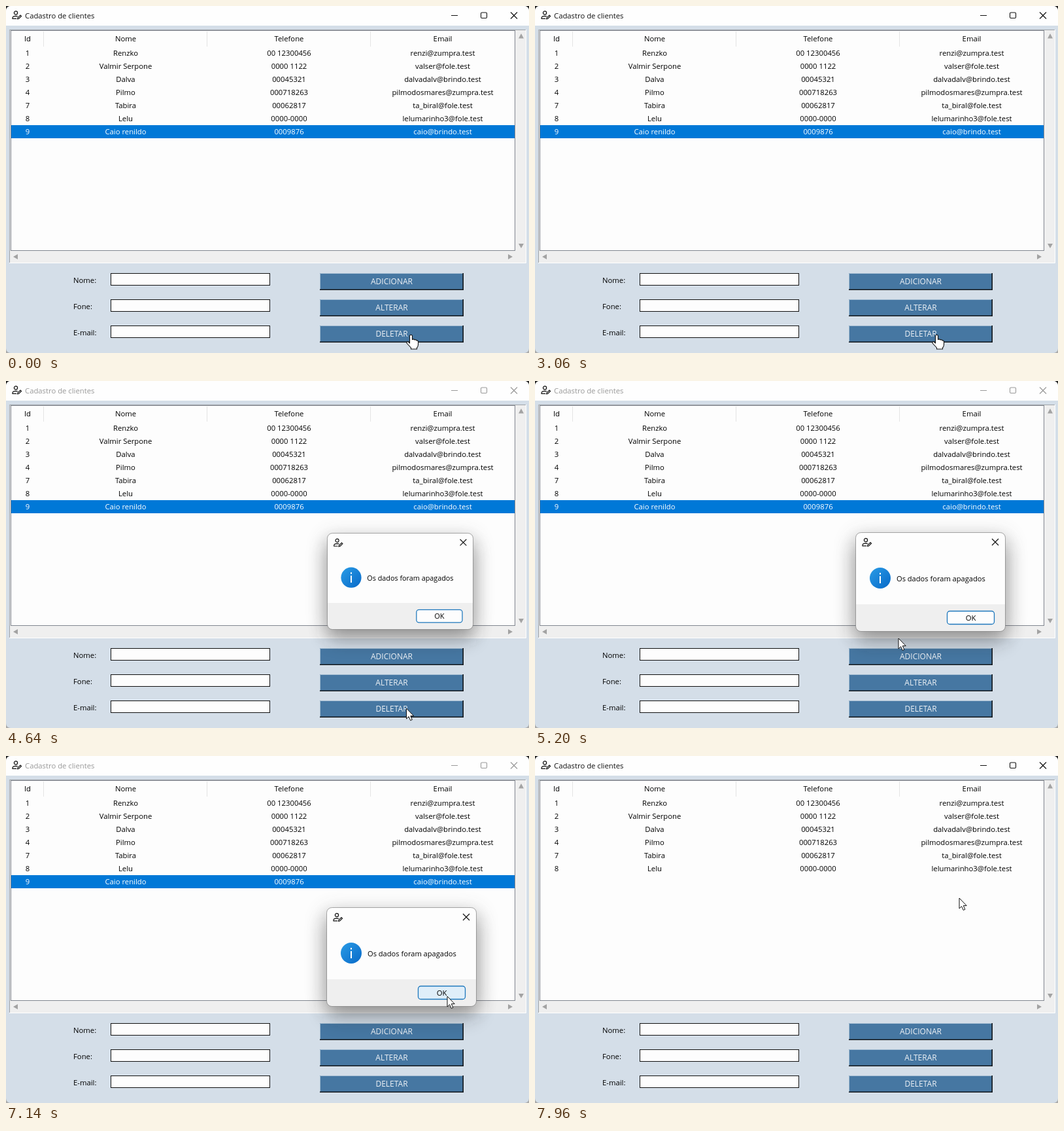
Animation, 800 px wide and 530 px high, one loop 8000 ms. Source, as an HTML page:

```html
<!DOCTYPE html>
<html lang="pt">
<head>
<meta charset="utf-8">
<style>
html, body { margin: 0; width: 100%; height: 100%; overflow: hidden; background: linear-gradient(#222 50%, #aaa 50%); }
svg { display: block; width: 800px; height: 530px; font: 11.3px "Open Sans", "Noto Sans", sans-serif; }
.mid { text-anchor: middle; }
.btn { font-size: 12px; fill: #eef2f6; }
.line { fill: none; stroke: #111; stroke-width: 1.2; }
</style>
</head>
<body>
<svg viewBox="0 0 800 530">
  <defs>
    <clipPath id="window"><rect width="800" height="530" rx="7"/></clipPath>
    <linearGradient id="info" x2="1" y2="1"><stop stop-color="#2a9ce6"/><stop offset="1" stop-color="#0869c8"/></linearGradient>
    <filter id="soft" x="-40%" y="-40%" width="180%" height="180%"><feGaussianBlur stdDeviation="15"/></filter>
    <g id="person" class="line">
      <circle cx="6" cy="3.5" r="2.6"/>
      <path d="M7 12.3H1V11Q1.5 8.5 6 8.4Q8 8.4 9 9M8.5 12.8L9 11L13 7L14.5 8.5L10.5 12.5Z"/>
    </g>
  </defs>
  <g clip-path="url(#window)">
    <rect width="800" height="530" fill="#d4dee8"/>
    <rect width="800" height="30" fill="#fefefe"/>
    <use href="#person" x="9" y="7"/>
    <g id="titleBar">
      <text x="29" y="19">Cadastro de clientes</text>
      <path fill="none" stroke="currentColor" stroke-width="1.1" d="M681 14.5H691M772 9.5L782 19.5M782 9.5L772 19.5M728 10H734Q735.5 10 735.5 11.5V17Q735.5 18.5 734 18.5H728Q726.5 18.5 726.5 17V11.5Q726.5 10 728 10Z"/>
    </g>
    <path fill="none" stroke="#a0a4a8" d="M5.5 392V36.5H795"/>
    <path fill="none" stroke="#fff" d="M5 392.5H795.5V36"/>
    <rect x="6" y="37" width="789" height="355" fill="#efefef"/>
    <rect x="7.5" y="37.5" width="771" height="336" fill="#fdfdfd" stroke="#828790"/>
    <path stroke="#e4e4e4" d="M57.5 39V62M307.5 39V62M557.5 39V62"/>
    <path fill="#a3a3a3" d="M784 49.5H792L788 42ZM784 363H792L788 370ZM18 379V387L11 383ZM768 379V387L775 383Z"/>
    <g id="table"></g>
    <g id="form"></g>
    <g id="dialog">
      <rect x="485" y="235" width="240" height="150" rx="12" fill="#444" opacity=".2" filter="url(#soft)"/>
      <rect x="491" y="250" width="228" height="148" rx="8" fill="#222" opacity=".38" filter="url(#soft)"/>
      <rect x="491" y="232" width="228" height="150" rx="8" fill="#fdfdfd"/>
      <path d="M491 341H719V374Q719 382 711 382H499Q491 382 491 374Z" fill="#efefef"/>
      <rect x="490.5" y="231.5" width="229" height="151" rx="8" fill="none" stroke="#888" stroke-opacity=".7"/>
      <use href="#person" x="500" y="239.5"/>
      <path class="line" d="M699 241L709 251M709 241L699 251"/>
      <circle cx="528" cy="301" r="16" fill="url(#info)"/>
      <path stroke="#fff" stroke-width="2" d="M528 298V309M528 293V295.5"/>
      <text x="553" y="306" font-weight="500" font-size="11.1">Os dados foram apagados</text>
      <rect id="ok" x="630.5" y="351.5" width="72" height="20" rx="4" stroke="#1f78bd" stroke-width="1.3"/>
      <text class="mid" x="666.5" y="366">OK</text>
    </g>
    <path id="hand" fill="#fff" stroke="#111" stroke-width="1.1" stroke-linejoin="round"
      d="M-2 1.5Q0 -1 2 1.5V7.5Q4 6 5.5 8Q7.5 7 8.5 9Q11 8.5 11 11V15Q11 18 9 20V22H0V20L-6.5 13Q-7 10.5 -4.5 10.5L-2 13Z"/>
    <path id="arrow" fill="#fff" stroke="#111" stroke-linejoin="round"
      d="M0 0V16L3.6 12.6L6.2 18.5L8.8 17.3L6.3 11.6H11.2Z"/>
  </g>
</svg>
<script>
const $ = id => document.getElementById(id);
const columns = [33, 183, 433, 668];
const clients = [
  ["1", "Renzko", "00 12300456", "renzi@zumpra.test"],
  ["2", "Valmir Serpone", "0000 1122", "valser@fole.test"],
  ["3", "Dalva", "00045321", "dalvadalv@brindo.test"],
  ["4", "Pilmo", "000718263", "pilmodosmares@zumpra.test"],
  ["7", "Tabira", "00062817", "ta_biral@fole.test"],
  ["8", "Lelu", "0000-0000", "lelumarinho3@fole.test"],
  ["9", "Caio renildo", "0009876", "caio@brindo.test"]
];

const text = (x, y, label, cls = "") => `<text class="${cls}" x="${x}" y="${y}">${label}</text>`;
const rowText = (cells, y) => cells.map((cell, i) => text(columns[i], y, cell, "mid")).join("");

$("table").innerHTML = rowText(["Id", "Nome", "Telefone", "Email"], 54) +
  clients.map((client, i) => i < 6 ? rowText(client, 76 + 20 * i) :
    `<g id="selected" fill="#fff"><rect x="8" y="182" width="770" height="20" fill="#0078d7"/>${rowText(client, 196)}</g>`).join("");

$("form").innerHTML = [["Nome:", "ADICIONAR"], ["Fone:", "ALTERAR"], ["E-mail:", "DELETAR"]].map(([label, action], i) => {
  const y = 408 + 40 * i;
  return text(103, y + 15, label) +
    `<rect x="160.5" y="${y + .5}" width="243" height="18" fill="#fdfdfd" stroke="#111"/>
     <rect x="480" y="${y}" width="220" height="26" fill="#4677a2"/>
     <path fill="none" stroke="#a4bdd2" d="M480.5 ${y + 25}V${y + .5}H699"/>
     <path fill="none" stroke="#14181c" stroke-width="1.6" d="M480 ${y + 25.2}H699.2V${y}"/>` +
    text(590, y + 17, action, "mid btn");
}).join("");

const OPEN = 4640, SETTLED = 4760, CLOSE = 7420, GONE = 7540;
const CURSOR_STEP = 120;
const handPath = [[120, 619.5, 502], [360, 614.5, 502]];
const arrowPath = [
  [4680, 612.5, 500], [5160, 556, 393], [5880, 675, 367],
  [7440, 675, 367], [7920, 649, 217]
];

// Eased position along [time, x, y] points
function along(path, t) {
  const next = path.findIndex(point => point[0] > t);
  if (next < 0) return path.at(-1).slice(1);
  if (next === 0) return path[0].slice(1);
  const [a, b] = [path[next - 1], path[next]];
  const u = (t - a[0]) / (b[0] - a[0]);
  const eased = u * u * (3 - 2 * u);
  return [a[1] + (b[1] - a[1]) * eased, a[2] + (b[2] - a[2]) * eased];
}

function show(id, visible) {
  $(id).style.display = visible ? "" : "none";
}

function draw(t) {
  const modal = t >= OPEN && t < CLOSE;
  $("titleBar").style.fill = $("titleBar").style.color = modal ? "#999" : "#111";

  show("dialog", t >= OPEN && t < GONE);
  const changing = t < SETTLED || t >= CLOSE;
  $("dialog").setAttribute("transform", changing ? "translate(603 306) scale(.974) translate(-605 -307)" : "");
  $("dialog").setAttribute("opacity", t >= CLOSE ? .5 : 1);
  show("selected", t < GONE);

  // The pointer moves in visible steps
  const stepped = Math.floor(t / CURSOR_STEP) * CURSOR_STEP;
  const [x, y] = along(arrowPath, stepped);
  const overOk = x > 630 && x < 703 && y > 351 && y < 372;
  $("ok").setAttribute("fill", overOk ? "#dfeef9" : "#fdfdfd");

  show("hand", t < OPEN);
  show("arrow", t >= OPEN);
  $("hand").setAttribute("transform", `translate(${along(handPath, stepped)})`);
  $("arrow").setAttribute("transform", `translate(${x} ${y})`);
}

const start = performance.now();
function tick() {
  draw((performance.now() - start) % 8000);
  requestAnimationFrame(tick);
}
tick();
</script>
</body>
</html>
```
